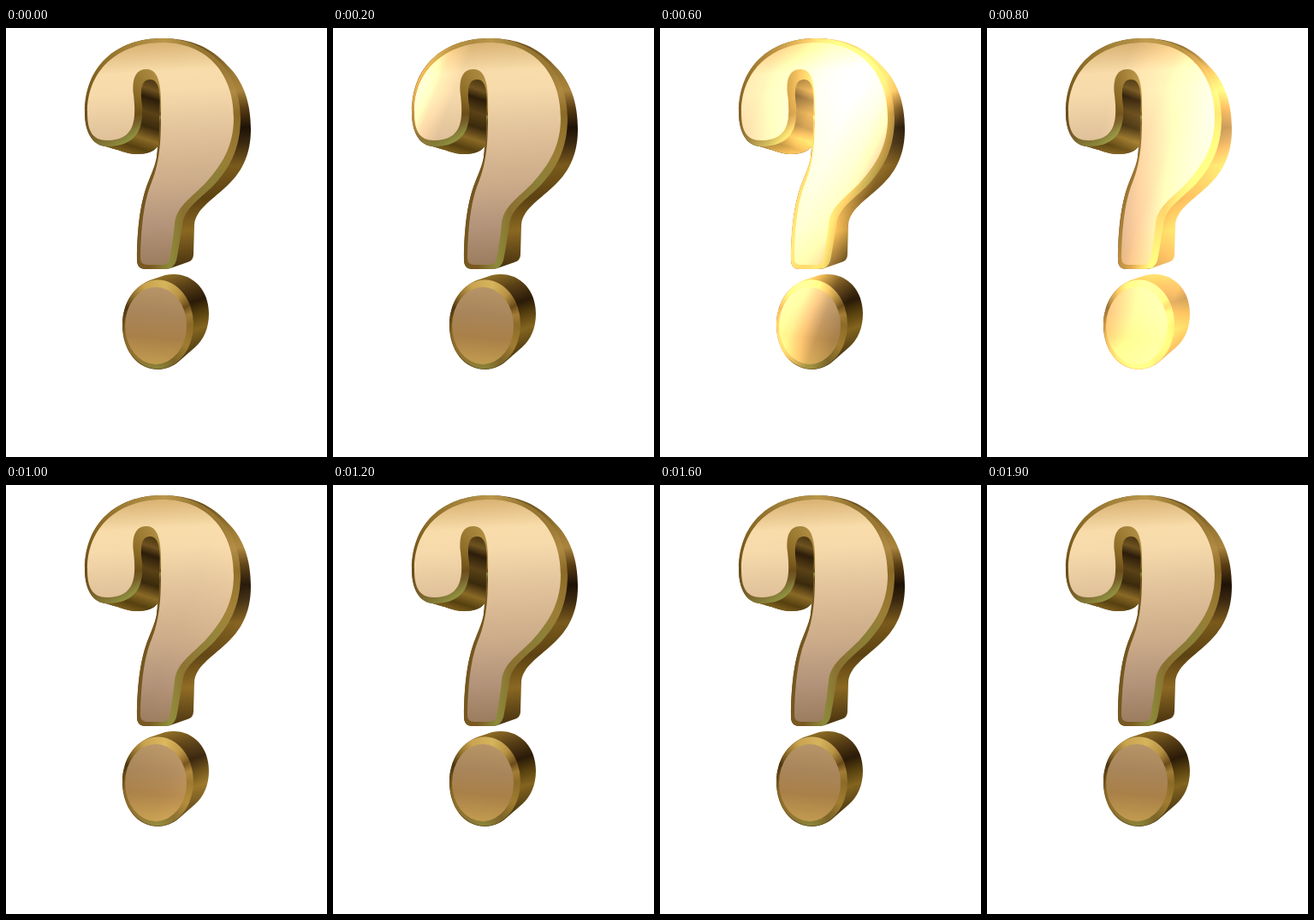
Recreate the animation shown at these times as an HTML page with a canvas. Size 375 by 500 pixels, loop 3400 ms.

```html
<!DOCTYPE html>
<html>
<head>
<meta charset="utf-8">
<style>
  html, body { margin: 0; width: 100%; height: 100%; overflow: hidden; background: #fff; }
  canvas { display: block; }
</style>
</head>
<body>
<canvas id="stage" width="375" height="500"></canvas>
<script>
const ctx = document.getElementById('stage').getContext('2d');
const LOOP = 3400, STEP = 100, SLANT = 0.38;

// Hook and stem: extruded silhouette, bevelled front, flat face
const body = new Path2D(`M92 98C93 45 128 12 183 12C216 12 240 23 258 43
  C277 61 286 86 286 118C286 150 274 170 256 186C240 201 221 212 220 230
  L219 264Q219 271 212 273L192 280Q188 281 182 281L163 281Q153 281 153 270
  C153 230 158 200 166 180C172 165 177 155 177 138C173 144 165 147 152 147
  C143 147 132 142 112 137C100 133 92 120 92 98Z`);
const bevel = new Path2D(`M92 98C92 45 128 12 183 12C235 12 274 50 274 105
  C274 142 260 165 241 185C223 202 208 211 206 230C203 247 202 257 199 271
  Q196 281 186 281L163 281Q153 281 153 270C153 230 158 200 166 180
  C172 165 177 155 178 138C179 128 179 118 179 105C181 78 180 60 168 60
  C157 60 157 75 159 90C161 117 153 138 118 138C100 138 92 120 92 98Z`);
const face = new Path2D(`M95 98C95 50 130 17 183 17C232 17 266 50 266 105
  C266 138 252 160 232 182C211 202 199 210 197 228C195 247 193 258 191 270
  Q190 276 181 276L165 276Q157 276 157 268C158 225 162 200 170 180
  C178 160 181 140 181 105C182 70 180 48 164 48C151 48 147 60 149 78
  C152 105 152 131 118 131C101 131 95 120 95 98Z`);

const dotBody = new Path2D(`M136 346C136 320 150 301 168 294L186 288
  C214 282 237 302 237 333C237 350 231 363 221 372L206 385
  C198 393 188 398 178 398C153 398 136 376 136 346Z`);
const dotBevel = oval(177.5, 345.5, 41.5, 52);
const dotFace = oval(175, 347, 36, 45);

const silhouette = new Path2D(body);
silhouette.addPath(dotBody);

function oval(x, y, rx, ry) {
  const path = new Path2D();
  path.ellipse(x, y, rx, ry, 0, 0, 2 * Math.PI);
  return path;
}

// stops: "offset colour, offset colour, ..."
function withStops(gradient, stops) {
  for (const stop of stops.split(',')) {
    const [offset, colour] = stop.trim().split(/\s+/);
    gradient.addColorStop(+offset, colour);
  }
  return gradient;
}
const linear = (x0, y0, x1, y1, stops) =>
  withStops(ctx.createLinearGradient(x0, y0, x1, y1), stops);
// Offsets run clockwise from the right
const conic = (x, y, stops) => withStops(ctx.createConicGradient(0, x, y), stops);

const sideFill = linear(222, 20, 240, 275, `0 #6b4f1c, .14 #9a7833, .22 #a9843c,
  .3 #5a3e14, .39 #1e1206, .46 #3a2810, .56 #7a5a1c, .7 #5c4212, .84 #8a6822, 1 #4a3410`);
const wallFill = linear(178, 62, 150, 148, `0 #4a3512, .13 #6e5220, .24 #2c1d0a,
  .42 #5a4216, .6 #3a290c, .76 #8a6a26, .9 #56400f, 1 #7a5c1c`);
const bevelFill = conic(185, 100, `0 #8a6a26, .09 #9c7d35, .15 #8c8038, .22 #8a7030,
  .245 #8c8a3a, .265 #7a5a20, .32 #6a5020, .4 #8f9040, .45 #77602a, .5 #6b4d18,
  .6 #8c6b26, .75 #b8964a, .83 #94742f, .9 #9c7a36, .95 #b08a44, 1 #8a6a26`);
const faceFill = linear(175, 17, 190, 276, `0 #d9b273, .13 #f8dcaa, .22 #f6daab,
  .4 #e2c39b, .62 #cdad8a, .82 #b4947a, 1 #9c7c5e`);
const dotSideFill = linear(190, 288, 222, 380, `0 #8a6a24, .18 #5a4016,
  .4 #2a1a08, .55 #57400f, .72 #83641f, 1 #4a3812`);
const dotBevelFill = conic(177, 346, `0 #8c6b28, .1 #a07c30, .18 #7c6428, .25 #8a8238,
  .34 #8f7434, .45 #8a6826, .52 #6b4d18, .58 #4c3610, .64 #8f6f2c, .7 #c9a450,
  .78 #d6b45c, .85 #b89244, .91 #6a4a18, .95 #a27c36, 1 #8c6b28`);
const dotFaceFill = linear(180, 302, 172, 393, `0 #b79568, .35 #a8855a,
  .65 #a98048, 1 #c39c50`);

function fill(path, style) {
  ctx.fillStyle = style;
  ctx.fill(path);
}

function drawMark() {
  fill(body, sideFill);
  ctx.save();
  ctx.clip(body);
  ctx.fillStyle = wallFill;
  ctx.fillRect(100, 55, 81, 95);
  ctx.restore();
  fill(bevel, bevelFill);
  fill(face, faceFill);
  fill(dotBody, dotSideFill);
  fill(dotBevel, dotBevelFill);
  fill(dotFace, dotFaceFill);
}

// Slanted band of added light, with a longer tail on its left
function drawShine(time) {
  const strength = Math.min(1, (1050 - time) / 200);
  if (strength <= 0) return;
  const centre = 0.43 * time - 6, tail = 160, lead = 90;
  const along = u => [u / (1 + SLANT ** 2), u * SLANT / (1 + SLANT ** 2)];
  const band = ctx.createLinearGradient(...along(centre - tail), ...along(centre + lead));
  const profile = [[-160, 0], [-105, .18], [-75, .4], [-40, .8], [0, 1], [35, .75], [68, .15], [90, 0]];
  for (const [offset, level] of profile) {
    band.addColorStop((offset + tail) / (tail + lead), `rgba(188,150,92,${level * strength})`);
  }
  ctx.save();
  ctx.clip(silhouette);
  ctx.globalCompositeOperation = 'lighter';
  ctx.fillStyle = band;
  ctx.fillRect(0, 0, 375, 500);
  ctx.restore();
}

function draw() {
  const time = Math.floor(performance.now() % LOOP / STEP) * STEP;
  ctx.fillStyle = '#fff';
  ctx.fillRect(0, 0, 375, 500);
  drawMark();
  drawShine(time);
  requestAnimationFrame(draw);
}
draw();
</script>
</body>
</html>
```
